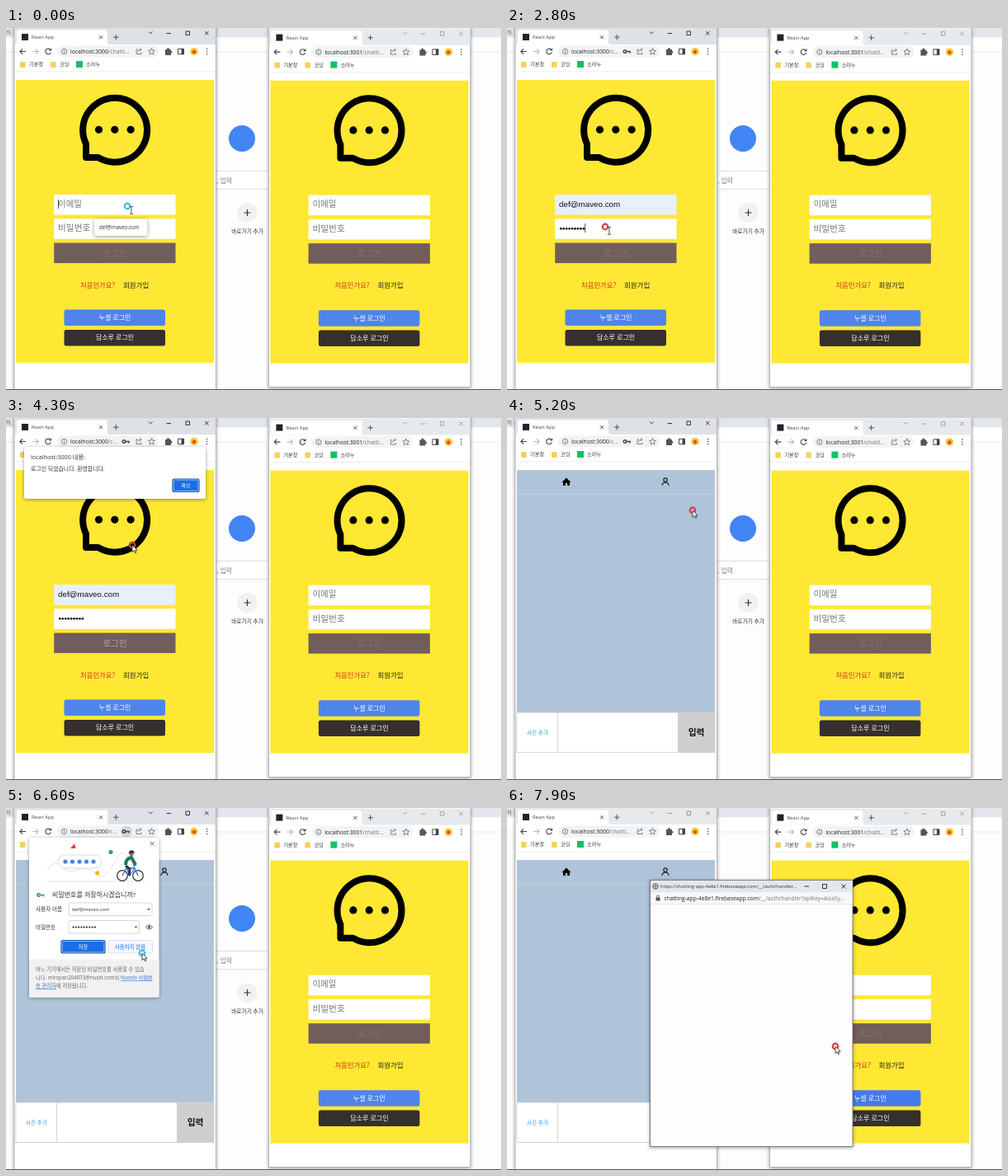
Animation of 600 by 439 pixels, one loop 8000 ms. Source, as an HTML page:

```html
<!DOCTYPE html>
<html lang="ko">
<head>
<meta charset="utf-8">
<style>
html, body { margin: 0; width: 100%; height: 100%; overflow: hidden; background: #fdfdfe; }
svg { display: block; width: 600px; height: 439px; font-family: "Open Sans", "Noto Sans CJK KR", sans-serif; }
.shadow { filter: drop-shadow(0 1px 2px rgba(0,0,0,.4)); }
</style>
</head>
<body>
<svg id="stage" viewBox="0 0 600 439"></svg>
<script>
const MAIL = 'def@maveo.com';
const rect = (x, y, w, h, fill, more = '') => `<rect x="${x}" y="${y}" width="${w}" height="${h}" fill="${fill}" ${more}/>`;
const disc = (x, y, r, fill, more = '') => `<circle cx="${x}" cy="${y}" r="${r}" fill="${fill}" ${more}/>`;
const text = (x, y, size, s, fill = '#333', more = '') => `<text x="${x}" y="${y}" font-size="${size}" fill="${fill}" ${more}>${s}</text>`;
const mid = (x, y, size, s, fill, more = '') => text(x, y, size, s, fill, 'text-anchor="middle" ' + more);
const path = (d, stroke = '#555', width = 1, more = '') => `<path d="${d}" fill="none" stroke="${stroke}" stroke-width="${width}" ${more}/>`;
const group = (id, body, more = '') => `<g id="${id}" ${more}>${body}</g>`;
const dots = (n, x, y, step, r, fill) => Array.from({ length: n }, (_, i) => disc(x + i * step, y, r, fill)).join('');
const key = (x, y, a, b) => disc(x - 2, y, 1.8, 'none', `stroke="${a}" stroke-width="1.4"`) + path(`M${x} ${y}h5m-1.400 0v2`, b, 1.4);

function controls(id, color) {
  return group(id, path('M173 4.500l2.300 2.300 2.300-2.300M194.500 6.500h5.500M218 4h4.500v4.500h-4.500zM241 4l4.500 4.500m0-4.500l-4.500 4.500', color, .9));
}

function chrome(id, port, height, active) {
  return rect(10, -3, 244.5, height + 3, '#fff', 'class="shadow" stroke="#aaa" stroke-width=".8"') +
    rect(10.4, 0, 243.7, 20, active ? '#dee1e6' : '#e7eaed', `id="${id}Strip"`) +
    '<path d="M10.400 20q2.500 0 2.500-3V5q0-2.500 3-2.500H120q3 0 3 2.500v12q0 3 3 3z" fill="#fff"/>' +
    rect(19, 7, 8, 8, '#20232a') + text(31, 13.3, 5.8, 'React App', '#444') +
    path('M113 9.300l4 4m0-4l-4 4M130 11.200h6.500m-3.250-3.250v6.500', '#444', .9) +
    controls(id + 'Ctl', active ? '#222' : '#999') +
    path('M24 28.500h-7m3-3.200l-3.200 3.200 3.200 3.200', '#444', 1.1) +
    path('M32 28.500h7m-3-3.200l3.200 3.200-3.200 3.200', '#bbb', 1.1) +
    path('M53.600 26.300a3.300 3.300 0 1 0 .7 3M54.600 24.700v2.300h-2.300', '#444', 1.1) +
    rect(62, 21.5, 123, 14, '#f1f3f4', 'rx="7"') +
    disc(70.5, 28.5, 3.2, 'none', 'stroke="#666" stroke-width=".8"') + path('M70.500 28v2.300M70.500 26.500v.8', '#666', .9) +
    text(78, 31, 6.8, `<tspan fill="#222">localhost:${port}</tspan>/<tspan id="${id}Url">chatti...</tspan>`, '#777') +
    path('M160 26h-2v5.500h6v-2M159.800 29q.5-3 4-3m-1.500-1.800l1.700 1.800-1.700 1.800', '#666', .8) +
    path('M176.500 24.500l1.100 2.700 2.900.2-2.200 1.900.7 2.800-2.500-1.500-2.500 1.500.7-2.800-2.200-1.900 2.900-.2z', '#666', .8) +
    '<path d="M193 26h2q0-2 1.500-2t1.500 2h2v2q1.500 0 1.500 1.300t-1.500 1.300V33h-7z" fill="#555"/>' +
    path('M208.500 25.300h7v6.500h-7z', '#444', 1) + rect(212.5, 25, 3.2, 7, '#444') +
    disc(228, 28.5, 4.7, '#fbc72f') + disc(228, 29, 2.3, '#d5532c') +
    [25.5, 28.5, 31.5].map(y => disc(243.5, y, .8, '#444')).join('') +
    [17, 54].map(x => rect(x, 41, 6.5, 7, '#f8cf5c', 'rx="1"')).join('') + rect(85, 40, 8, 8, '#10c262') +
    text(28, 46.3, 6.2, '기본창') + text(65, 46.3, 6.2, '코딩') + text(97, 46.3, 6.2, '소라누') +
    path('M10.500 53h243.500', '#e3e3e3', .7);
}

function login(id) {
  return rect(12, 63.5, 240, 343, '#fee833') +
    path('M112 157.500H97V141A39 39 0 1 1 112 157.500Z', '#000', 8, 'stroke-linejoin="round"') + dots(3, 112.5, 123.7, 19.3, 4.6, '#000') +
    rect(58.2, 202.5, 147.3, 24.5, '#fff', `id="${id}Mail"`) + rect(58.2, 231.7, 147.3, 24.5, '#fff') +
    text(63, 217, 10.5, '이메일', '#777', `id="${id}Hint1"`) + text(63, 246.7, 10.7, '비밀번호', '#777', `id="${id}Hint2"`) +
    rect(58.2, 261, 147.3, 24.5, '#725d5d') + mid(132, 277, 10.7, '로그인', '#877069', `id="${id}Go"`) +
    text(90, 315, 8.4, '처음인가요?', '#d8321c') + text(142, 315, 8.5, '회원가입', '#222') +
    rect(70.5, 342, 122.5, 19.5, '#4f84ea', `id="${id}Blue" rx="2.5"`) + mid(132, 354.4, 8, '누셀 로그인', '#fff') +
    rect(70.5, 366.3, 122.5, 19.5, '#352f2e', 'rx="2.5"') + mid(132, 378.9, 8, '담소루 로그인', '#fff');
}

const chat = rect(12, 63.5, 240, 294, '#b0c4d9') + path('M12 93h240', '#c8d4df', .8) +
  '<path d="M66.500 78.300l5.500-5.300 5.500 5.300h-1.500v4.200h-2.800v-3h-2.400v3h-2.800v-4.200z"/>' +
  disc(192, 75.5, 2.2, 'none', 'stroke="#222" stroke-width="1.2"') + path('M188 82.500q0-4 4-4t4 4', '#222', 1.2) +
  rect(12, 357.5, 240, 48.5, '#fff', 'stroke="#ccc" stroke-width=".8"') + path('M61.500 357.500v48.500', '#ccc', .8) +
  rect(207, 357.5, 45, 48.5, '#d0ced0') + mid(37, 384, 6.6, '사진 추가', '#38a0e0') + mid(229.5, 385.5, 10.7, '입력', '#111', 'font-weight="700"');

const focusButton = (x, y, w, h) => rect(x, y, w, h, '#1a6fe4', 'rx="2" stroke="#164f9c" stroke-width="1.2"') +
  rect(x + 1, y + 1, w - 2, h - 2, 'none', 'stroke="#d5e5fa" stroke-width=".7" rx="1"');

const alertBox = rect(22, 35, 220, 63, '#fff', 'class="shadow" rx="2.5"') +
  text(30, 50, 7.25, 'localhost:3000 내용:') + text(30, 63.7, 6.9, '로그인 되었습니다. 환영합니다.') +
  focusButton(202, 74, 32, 15.5) + mid(218, 84, 6, '확인', '#fff');

const cyclist = [141, 160].map(x => disc(x, 82, 6.3, 'none', 'stroke="#333" stroke-width="1.2"')).join('') +
  path('M141 82l5-9h10l4 9M146 73l4 9 6-9-1-4h3', '#3478e5', 1.3) +
  path('M145 70l5 4-1 8', '#25364a', 3) + path('M145 69q0-8 7-9l5 9', '#1f7a54', 4) + disc(152, 55.5, 2.8, '#a86545') +
  '<path d="M148.500 55q1-4 4-3.700t3.500 3z" fill="#25364a"/>';

const field = (y, w) => rect(76, y, w, 15.5, '#fff', 'stroke="#ccc" stroke-width=".8" rx="1.5"') +
  `<path d="M${70 + w} ${y + 7}h4l-2 2.300z" fill="#555"/>`;

const saveBox = rect(28, 36, 157.5, 193.5, '#fff', 'class="shadow" rx="2.5"') +
  path('M175 41l4.500 4.500m0-4.500l-4.500 4.500', '#555', .9) + path('M49 89h119', '#ddd', .8) +
  path('M50 75q8-13 17-4t20 4 22 5 22-14 20 0 16 13', '#e2e5e8', 1) +
  rect(63, 57, 53, 16, '#fff', 'rx="8" stroke="#d8dce2"') + dots(5, 72, 65, 8.5, 2.6, '#4285f4') +
  '<path d="M78 49l5-6 1.500 6z" fill="#ea4335"/><path d="M108 77l4.500-1 1 4.500-4.500 1z" fill="#fbbc04"/>' + disc(127, 53.5, 2.6, '#34a853') + cyclist +
  key(41.5, 105.5, '#34805a', '#4285f4') + text(56, 108, 8, '비밀번호를 저장하시겠습니까?') +
  text(36, 125.3, 6.6, '사용자 이름') + field(115, 101) + text(80, 125.3, 5.8, MAIL) +
  text(36, 146.5, 6.5, '비밀번호') + field(136.5, 85.5) + dots(9, 81.5, 144.5, 3.3, 1.1, '#222') +
  path('M169.500 144.500q4-5 8 0q-4 5-8 0z', '#444', .9) + disc(173.5, 144.5, 1.4, '#444') +
  focusButton(67, 160.5, 53, 15.5) + mid(93.5, 170.5, 6.3, '저장', '#fff') +
  rect(124, 160.5, 53.5, 15.5, '#f3f7fe', 'rx="2" stroke="#d3ddec" stroke-width=".8"') + mid(150.5, 170.5, 6.5, '사용하지 않음', '#1a73e8') +
  rect(28, 183.5, 157.5, 46, '#f1f1f2') +
  text(36, 198.4, 6.3, '어느 기기에서든 저장된 비밀번호를 사용할 수 있습', '#666') +
  text(36, 208.4, 6.2, '니다. miropan204873@nusel.com의 <tspan fill="#2f72cf" text-decoration="underline">Nuselo 비밀번</tspan>', '#666') +
  text(36, 218.4, 6.3, '<tspan fill="#2f72cf" text-decoration="underline">호 관리자</tspan>에 저장됩니다.', '#666');

const SITE = 'chatting-app-4e8e1.firebaseapp.com';
const popup = rect(173.5, 87.5, 245.5, 323, '#fdfdfe', 'class="shadow" stroke="#777" stroke-width=".9"') +
  rect(174, 88, 244.5, 14.5, '#e4e7eb') + rect(174, 102.5, 244.5, 14, '#f8f8f9') + path('M174 116.700h244.500', '#ddd', .7) +
  path('M360.500 95h5.500M382.500 92.500h5v5h-5zM405.500 92.500l5 5m0-5l-5 5', '#222', .9) +
  group('address', disc(180, 95, 3.2, 'none', 'stroke="#555"') + path('M177 95h6M180 92v6', '#555', .8) +
    text(186, 97, 5.7, `https://${SITE}/__/auth/handler...`) +
    rect(180.5, 108.5, 5, 4, '#555') + path('M181.500 109v-1.500q0-1.500 1.500-1.500t1.500 1.500v1.500', '#555', .9) +
    text(190.5, 112, 6.7, `<tspan fill="#222">${SITE}</tspan>/__/auth/handler?apiKey=AIzaSy...`, '#777'));

const behind = rect(0, 0, 600, 11.5, '#e3e6ea') + rect(0, 11.5, 600, 17, '#fff') + path('M0 29h600', '#e2e4e7', .8) +
  text(0, 8, 6.5, '하', '#666') + disc(286, 134, 16, '#4285f4') +
  rect(150, 173.5, 300, 22, '#fff', 'stroke="#dcdee1" stroke-width=".9"') + text(254, 187.5, 7.6, '., 입력', '#777') +
  disc(292.5, 224, 12, '#eff1f3') + path('M288.500 224h8m-4-4v8', '#333', 1.2) + mid(292.5, 249, 6.7, '바로가기 추가', '#333');

const $ = id => document.getElementById(id);
const page = 'transform="translate(0 -.4)"';
$('stage').innerHTML = behind +
  group('left', chrome('a', 3000, 442, true) +
    group('keyIcon', disc(146, 28.5, 7, '#d5d8db', 'id="keyGlow"') + key(145, 28.5, '#444', '#444')) +
    group('loginPage', login('a') + text(63, 217.3, 9.8, MAIL, '#111', 'id="mailText" font-family="Liberation Sans, sans-serif"') +
      group('secret', '') + rect(0, 0, .8, 11, '#222', 'id="caret"'), page) +
    group('chatPage', chat, page)) +
  group('right', chrome('b', 3001, 435, false) + group('rightPage', login('b'), page), 'transform="translate(308.4 .6)"') +
  group('suggest', rect(107, 231.5, 64.5, 20.5, '#fff', 'class="shadow" rx="2"') + text(113, 244, 6.2, MAIL)) +
  group('alert', alertBox) + group('save', saveBox) + group('popup', popup) +
  path('M0 438.500h600', '#555', 1) +
  group('mouse', disc(0, 0, 3.3, 'none', 'id="ring" stroke-width="2.2"') +
    group('beam', path('M3 .5h1.300l.7.700.7-.7H7M5 1v8M3 9.500h1.300l.7-.7.7.7H7', '#222', .8)) +
    group('arrow', '<path d="M0 0v8.500l2-1.800 1.500 3 1.300-.6-1.400-2.900h2.800z" fill="#fff" stroke="#222" stroke-width=".8"/>') +
    group('hand', '<path d="M2 6V1.500q1-1.300 2 0V4l3.500 1v3L6.500 10.500H3L.3 7.300q.3-1.300 1.700 0z" fill="#fff" stroke="#222" stroke-width=".8"/>'));

// Pointer stops: time, x, y
const stops = [[0, 147, 216], [300, 137, 241], [500, 137, 241], [900, 119, 241], [3200, 119, 241], [3600, 128, 273], [3800, 128, 273],
  [4300, 153, 154], [4700, 219, 82], [4900, 219, 83], [5200, 225, 112], [5500, 251, 135], [6000, 235, 150], [6500, 165, 176],
  [6800, 165, 176], [7200, 463, 347], [7600, 463, 347], [7900, 398, 289]];
const strokes = [1300, 1600, 1700, 1900, 2100, 2300, 2400, 2600, 2800];
const presses = [0, 400, 1000, 3700, 4800, 6600, 7300];

function pointer(t) {
  const i = stops.findIndex(s => s[0] > t);
  if (i < 0) return stops[stops.length - 1].slice(1);
  const [t0, x0, y0] = stops[i - 1], [t1, x1, y1] = stops[i];
  const u = (t - t0) / (t1 - t0), e = u * u * (3 - 2 * u);
  return [x0 + (x1 - x0) * e, y0 + (y1 - y0) * e];
}
const show = (id, on) => $(id).setAttribute('display', on ? 'inline' : 'none');
const set = (id, name, value) => $(id).setAttribute(name, value);

function draw(t) {
  const filled = t >= 500, typed = strokes.filter(s => s <= t).length;
  const within = (a, b) => t >= a && t < b;
  show('suggest', t < 500);
  show('aHint1', !filled);
  show('mailText', filled);
  set('aMail', 'fill', filled ? '#e8f0fe' : '#fff');
  show('aHint2', !typed);
  $('secret').innerHTML = dots(typed, 65.3, 243.7, 3.45, 1.35, '#111');
  show('caret', t < 3700);
  set('caret', 'x', t < 900 ? 63 : 63.3 + typed * 3.45);
  set('caret', 'y', t < 900 ? 208.5 : 237.5);
  set('aGo', 'fill', t >= 3700 ? '#b3a29e' : '#877069');

  const keyOn = within(1300, 6800);
  show('keyIcon', keyOn);
  show('keyGlow', t >= 5400);
  $('aUrl').textContent = keyOn ? 'c...' : 'chatti...';
  show('alert', within(3900, 4900));
  show('loginPage', t < 4900);
  show('chatPage', t >= 4900);
  show('save', within(5400, 6800));
  const active = t < 7200;
  set('aStrip', 'fill', active ? '#dee1e6' : '#e7eaed');
  set('aCtl', 'opacity', active ? 1 : .45);
  set('bBlue', 'fill', within(7200, 7800) ? '#2f6fe2' : t >= 7800 ? '#437aec' : '#4f84ea');
  show('popup', t >= 7600);
  show('address', t >= 7800);

  const [x, y] = pointer(t);
  set('mouse', 'transform', `translate(${x} ${y})`);
  set('ring', 'stroke', presses.some(p => within(p, p + 100)) ? '#3cc0e4' : '#d9403c');
  const beam = t < 200 || within(600, 3500), hand = within(3500, 3900) || within(7200, 7600);
  show('beam', beam);
  show('hand', hand);
  show('arrow', !beam && !hand);
}

// The screen advances at ten pictures a second
function tick(now) {
  draw(Math.floor(now % 8000 / 100) * 100);
  requestAnimationFrame(tick);
}
draw(0);
requestAnimationFrame(tick);
</script>
</body>
</html>
```
